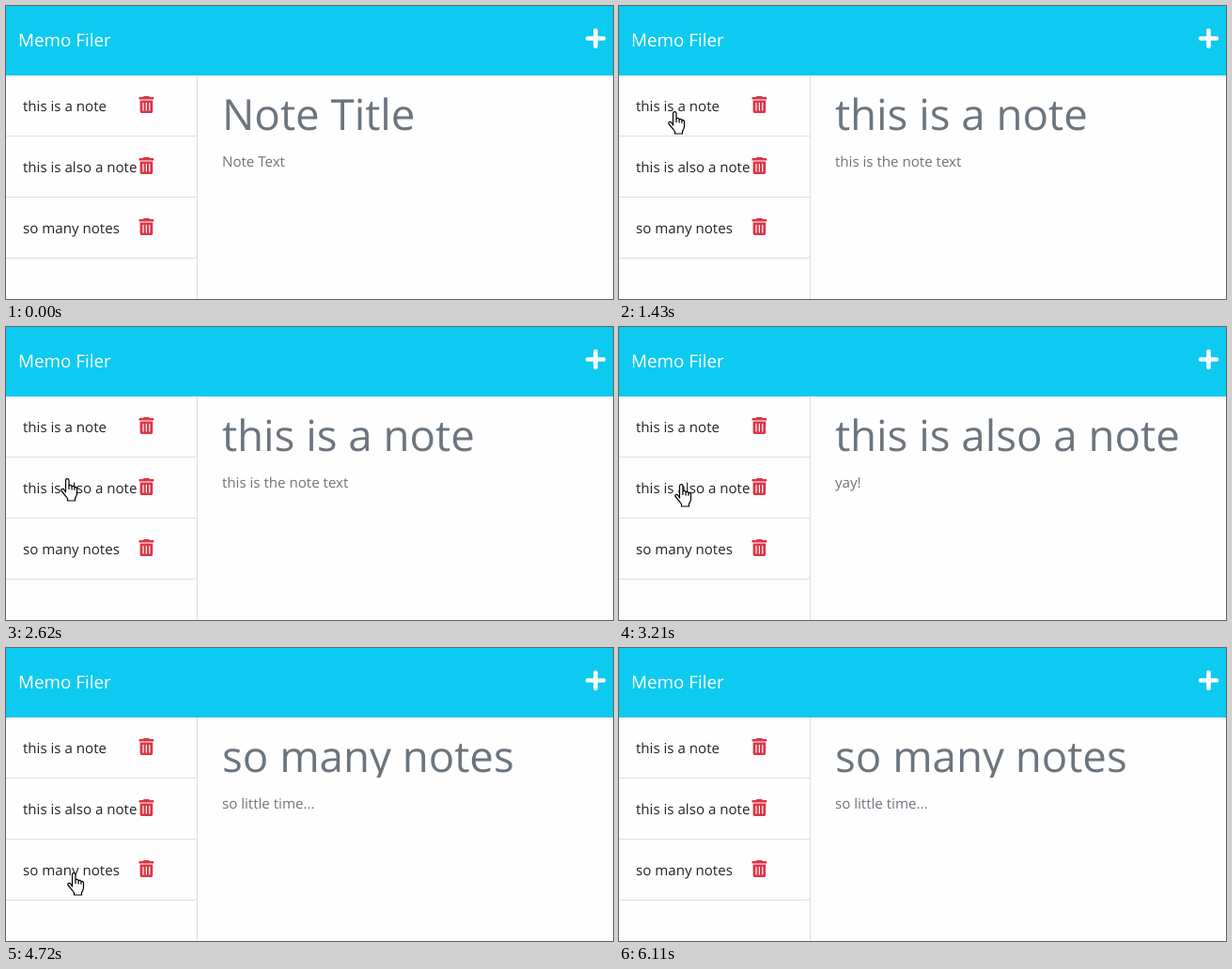
Write an HTML page that moves like this. It is 646 px wide and 312 px high and loops after 6.15 s.

```html
<!DOCTYPE html>
<html lang="en">
<head>
<meta charset="utf-8">
<title>Notes</title>
<style>
  html, body { margin: 0; width: 100%; height: 100%; overflow: hidden; background: #fefefe; }
  svg { display: block; width: 646px; height: 312px; }
  text { font: 15.1px "Open Sans", "Noto Sans", sans-serif; fill: #212529; text-rendering: geometricPrecision; }
  #brand { font-size: 18.8px; fill: #fff; }
  #title { font-size: 45.6px; fill: #6c757d; }
  #body { fill: #6c757d; }
  .rule { fill: none; stroke: #dfdfdf; }
</style>
</head>
<body>
<svg viewBox="0 0 646 312">
  <defs>
    <clipPath id="field"><path d="M225 80h421v58H225z"/></clipPath>
    <g id="trash">
      <path fill="#dc3545" d="M0 1.700Q0 1.100.6 1.100H4.300L5.200 0h5.400l.9 1.100h3.700q.6 0 .6.600V3.400H0zM1.100 4.500H14.700V16.300q0 1.700-1.700 1.700H2.800q-1.700 0-1.700-1.700z"/>
      <path stroke="#fefefe" stroke-width="1.200" stroke-linecap="round" d="M4.500 7.400v7.700M7.900 7.400v7.700M11.300 7.400v7.700"/>
    </g>
  </defs>
  <path fill="#0dcaf0" d="M0 0h646v74H0z"/>
  <text id="brand" x="13" y="43">Memo Filer</text>
  <path stroke="#fff" stroke-width="4.600" stroke-linecap="round" d="M619 34.500h17M627.500 26v17"/>
  <path class="rule" d="M203.500 74v238M0 138.500h203M0 203.500h203M0 268.500h200q3.500 0 3.500-3.500"/>
  <g id="list"></g>
  <g clip-path="url(#field)"><text id="title" x="230" y="132"></text></g>
  <text id="body" x="230" y="171"></text>
  <g id="hand" stroke="#000" stroke-width="1.200" stroke-linejoin="round">
    <path fill="#fff" d="M5.500 15V2.400a1.700 1.700 0 0 1 3.500 0V8c.5-1 3-.8 3.100.8.6-.9 2.700-.5 2.800 1 .8-.7 2.600-.2 2.600 1.400V16c0 3-1.500 4-2 5.500V24H7.500v-2.500C5.500 19 3.500 16.500 1 13.500c-1-2 1.500-3 2.800-1.300z"/>
    <path fill="none" d="M9 8v4M12.100 8.800v3.600M14.900 9.800v3"/>
  </g>
</svg>
<script>
const LOOP = 6150;
const get = id => document.getElementById(id);

const notes = ["this is a note", "this is also a note", "so many notes"];
get("list").innerHTML = notes.map((note, i) =>
  `<text x="18" y="${112 + 65 * i}">${note}</text><use href="#trash" x="141.500" y="${96 + 65 * i}"/>`).join("");

// [start time, title, text]
const views = [
  [0, "Note Title", "Note Text"],
  [1200, notes[0], "this is the note text"],
  [2960, notes[1], "yay!"],
  [4380, notes[2], "so little time..."]
];

// [time, x, y] of the pointer's top left corner
const path = [
  [430, 82, 314], [780, 56, 121], [860, 56, 121], [1050, 52, 112], [2240, 52, 112],
  [2720, 59, 167], [3500, 59, 167], [3960, 65, 239], [5020, 65, 239], [5260, 76, 314]
];

function pointerAt(t) {
  const i = path.findIndex(p => p[0] > t);
  if (i < 1) return [0, 400];
  const [t0, x0, y0] = path[i - 1], [t1, x1, y1] = path[i];
  const u = (t - t0) / (t1 - t0), e = u * u * (3 - 2 * u);
  return [x0 + (x1 - x0) * e, y0 + (y1 - y0) * e];
}

function draw(now) {
  const t = now % LOOP;
  const [, title, body] = views.findLast(v => v[0] <= t);
  get("title").textContent = title;
  get("body").textContent = body;
  get("hand").setAttribute("transform", `translate(${pointerAt(t).map(Math.round)})`);
  requestAnimationFrame(draw);
}
draw(0);
</script>
</body>
</html>
```
